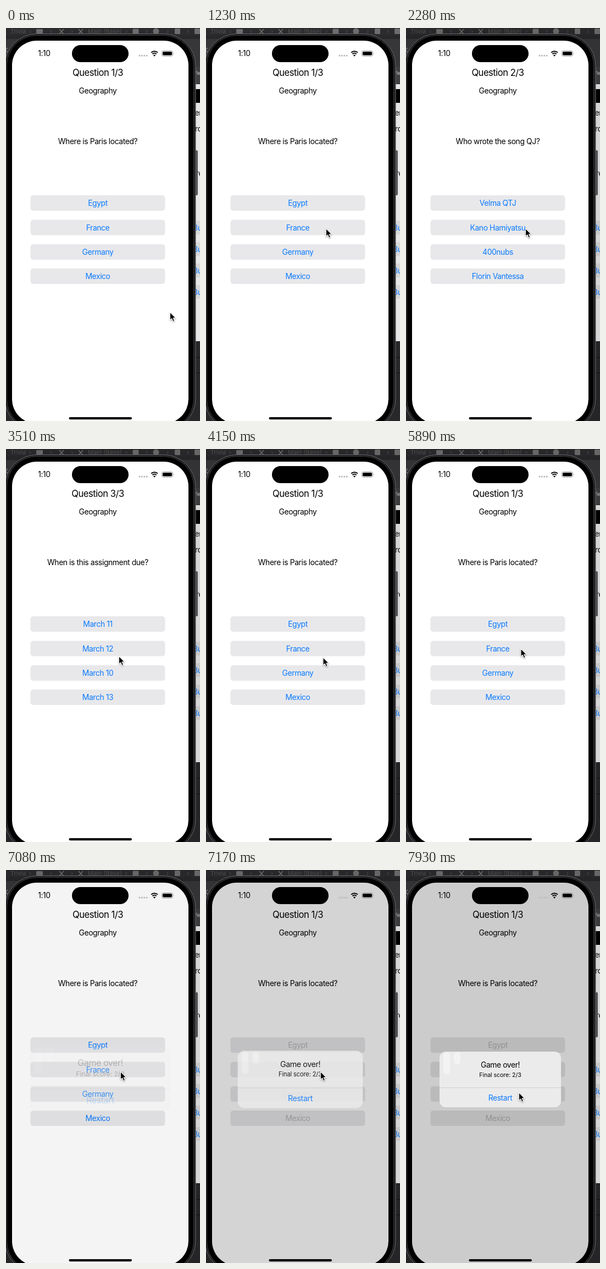
Write an HTML page that moves like this. It is 353 px wide and 714 px high and loops after 7990 ms.

```html
<!DOCTYPE html>
<html lang="en">
<head>
<meta charset="utf-8">
<title>Quiz demo</title>
<style>
  html, body { margin: 0; width: 100%; height: 100%; overflow: hidden; background: #29292b; }
  svg { display: block; width: 353px; height: 714px; }
  text { font: 13.9px Inter, "Open Sans", sans-serif; letter-spacing: -.03em; }
  .mid { text-anchor: middle; }
  .tint { fill: #0a7aff; }
  #bar text { font-size: 11px; letter-spacing: 0; }
</style>
</head>
<body>
<svg viewBox="0 0 353 714">
  <!-- editor window behind the phone -->
  <rect width="353" height="714" fill="#29292b"/>
  <rect width="353" height="13" fill="#2d2d2f"/>
  <rect y="20" width="353" height="51" fill="#39393b"/>
  <path d="M3 36l-4 4 4 4" fill="none" stroke="#8a8a8c" stroke-width="1.3"/>
  <g id="bar" fill="#555557" stroke="none"></g>
  <rect x="340" y="71" width="13" height="30" fill="#424244"/>
  <text x="341" y="85" font-weight="600" fill="#c9c9cb" style="font-size:9px">View</text>
  <rect x="340" y="102" width="13" height="467" fill="#ededee"/>
  <rect x="340" y="111" width="13" height="25" fill="#000"/>
  <g id="canvas"></g>
  <rect x="344" y="222" width="5" height="82" rx="2.5" fill="#565658"/>
  <path d="M340 598.5h13M340 626.5h13" stroke="#111"/>
  <rect id="shade" width="353" height="714"/>

  <!-- phone -->
  <rect x="-2" y="10.5" width="347" height="721" rx="58" fill="#1c1c1e" stroke="#69696b"/>
  <rect x="1.5" y="13.5" width="340" height="715" rx="54.5" stroke="#3a3a3c"/>
  <rect x="11" y="23" width="321" height="696" rx="45" fill="#fff"/>
  <text class="mid" x="167" y="87" id="count" style="font-size:16.6px"></text>
  <text class="mid" x="167" y="119">Geography</text>
  <text class="mid" x="167" y="211" id="ask"></text>
  <g id="rows"></g>
  <rect id="dim" x="11" y="23" width="321" height="696" rx="45"/>

  <g id="alert">
    <rect x="61" y="330" width="221" height="101" rx="11.5" fill="#ebebec"/>
    <path d="M74 337v28M93 337v10" stroke="#f3f3f3" stroke-width="12" stroke-linecap="round"/>
    <text class="mid" x="171.5" y="359" font-weight="600">Game over!</text>
    <text class="mid" x="171.5" y="375.5" style="font-size:10.7px;letter-spacing:-.01em">Final score: 2/3</text>
    <path d="M61 395.5h221" stroke="#cfcfd1"/>
    <text class="mid tint" x="171.5" y="418.5">Restart</text>
  </g>

  <!-- status bar and home indicator -->
  <text class="mid" x="69.5" y="51" font-weight="600">1:10</text>
  <rect x="120" y="31" width="103" height="31" rx="15.5"/>
  <path d="M243 50.2h14" stroke="#bcbcbe" stroke-width="3.2" stroke-linecap="round" stroke-dasharray="0 4.4"/>
  <g fill="none" stroke="#000" stroke-width="2">
    <path d="M264.2 44.6a8.4 8.4 0 0 1 11.8 0M266.5 47.2a5.2 5.2 0 0 1 7.2 0"/>
  </g>
  <path d="M270.1 51.8l-2.1-2.3a3 3 0 0 1 4.2 0z"/>
  <rect x="283.5" y="41.5" width="20" height="9.6" rx="3" fill="none" stroke="#8e8e90"/>
  <rect x="285" y="43" width="17" height="6.6" rx="1.8"/>
  <path d="M304.7 44.8q1.4 1.5 0 3z" fill="#8e8e90"/>
  <rect x="114.5" y="707" width="114.5" height="4.2" rx="2.1"/>

  <g id="cursor" style="filter:drop-shadow(0 1px 1px #0006)">
    <path d="M.4.4V15l3.3-3.1 2.3 5.4 2.6-1.1-2.3-5.3h4.6z" stroke="#fff" stroke-width="1.1" stroke-linejoin="round"/>
  </g>
</svg>
<script>
const LOOP = 7990;
const $ = id => document.getElementById(id);

const quiz = [
  ["Where is Paris located?", "Egypt", "France", "Germany", "Mexico"],
  ["Who wrote the song QJ?", "Velma QTJ", "Kano Hamiyatsu", "400nubs", "Florin Vantessa"],
  ["When is this assignment due?", "March 11", "March 12", "March 10", "March 13"]
];

// time, x, y of the pointer tip
const path = [
  [0, 298, 516], [480, 298, 516], [1230, 218, 364], [2230, 218, 364],
  [2560, 205, 362], [3170, 205, 362], [3510, 205, 376], [3630, 205, 376],
  [3850, 205, 372], [3990, 205, 372], [4550, 243, 403], [4950, 243, 402],
  [5030, 243, 402], [5140, 216, 354], [5280, 216, 354], [6010, 208, 363],
  [6400, 208, 363], [6600, 208, 366], [7670, 208, 366], [7930, 205, 404], [LOOP, 205, 404]
];

function pointer(t) {
  const i = path.findIndex(k => k[0] > t);
  const [t0, x0, y0] = path[i - 1], [t1, x1, y1] = path[i];
  const u = (t - t0) / (t1 - t0), e = u * u * (3 - 2 * u);
  return [x0 + (x1 - x0) * e, y0 + (y1 - y0) * e];
}

// path bar of the editor
const cross = x => `<path d="M${x - 4} 2l8 9M${x + 4} 2l-8 9" stroke="#717173" stroke-width="1.6"/>`;
const block = (x, w, h) => `<rect x="${x - w / 2}" y="${6 - h / 2}" width="${w}" height="${h}" rx="1.5" fill="#717173"/>`;
$("bar").innerHTML =
  `<text x="8" y="10">Trivia</text><text x="149" y="10">Main (Base)</text>` +
  [44, 82, 120, 219, 256, 294, 331].map(x => `<text x="${x - 2}" y="10">›</text>`).join("") +
  cross(101) + cross(136) + block(61, 12, 8) + block(236, 11, 9) +
  `<circle cx="273" cy="6" r="5.5" fill="#717173"/>` + block(312, 10, 10) + block(348, 10, 10);

// storyboard peeking out on the right
$("canvas").innerHTML =
  `<text x="343.5" y="159">er</text><text x="344" y="188">rc</text><text x="346" y="269">rc</text>` +
  [363, 402, 441, 480].map(y =>
    `<rect x="340" y="${y - 13}" width="13" height="25" fill="#dededf"/>
     <text class="tint" x="340" y="${y + 5}">Button</text>`).join("");

const rowY = [304, 348.5, 393, 437];
$("rows").innerHTML = rowY.map(y =>
  `<rect x="44.5" y="${y}" width="245" height="28" rx="5" fill="#e8e8ea"/>
   <text class="mid tint" x="167" y="${y + 19}"></text>`).join("");
const labels = [...$("rows").querySelectorAll("text")];

function draw(t) {
  const q = t >= 1500 && t < 2800 ? 1 : t >= 2800 && t < 4030 ? 2 : 0;
  const pressed = t >= 1350 && t < 1500 || t >= 3850 && t < 4030;
  const shown = t < 7080 ? 0 : t < 7170 ? .21 : t < 7410 ? .85 : 1;

  $("count").textContent = `Question ${q + 1}/3`;
  $("ask").textContent = quiz[q][0];
  labels.forEach((label, i) => {
    label.textContent = quiz[q][i + 1];
    label.style.fill = shown > .5 ? "#b4b4b6" : "";
    label.style.opacity = pressed && i === 1 ? .3 : t >= 2800 && t < 2920 ? .6 : 1;
  });
  $("shade").style.opacity = t < 1350 ? .03 : .1;
  $("dim").style.opacity = .2 * shown;
  $("alert").style.opacity = shown;
  $("alert").setAttribute("transform",
    `translate(171.5 380.5) scale(${1.2 - .2 * shown}) translate(-171.5 -380.5)`);
  $("cursor").setAttribute("transform", `translate(${pointer(t)})`);
}

const start = performance.now();
function tick() {
  draw((performance.now() - start) % LOOP);
  requestAnimationFrame(tick);
}
tick();
</script>
</body>
</html>
```
